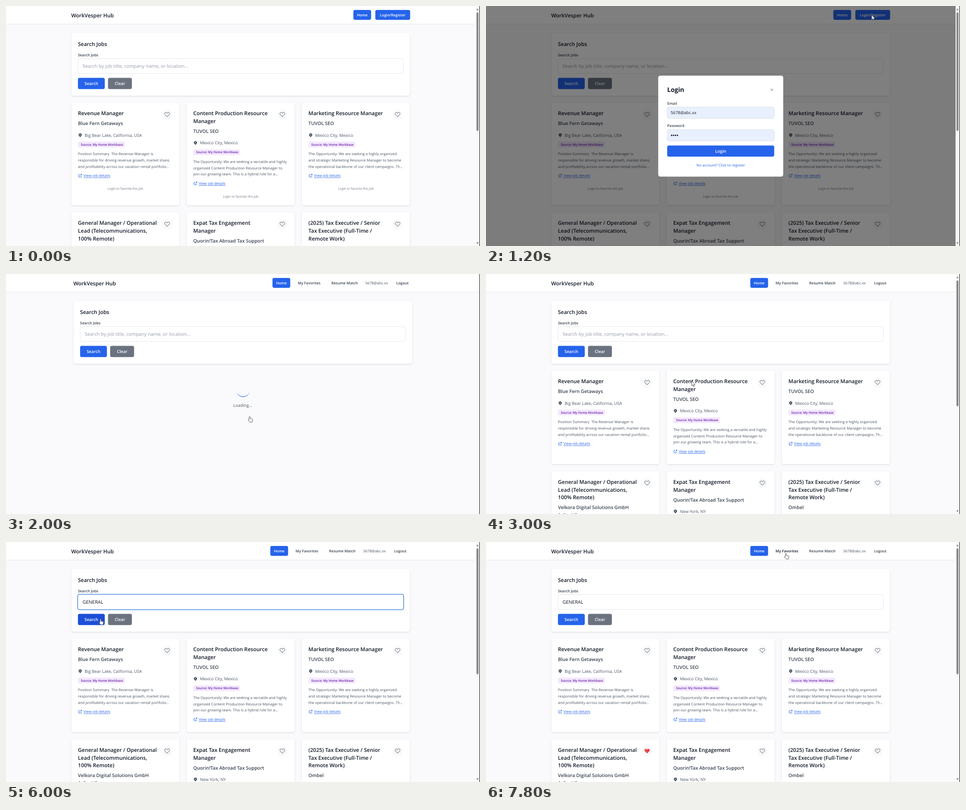
Recreate the animation shown at these times as an HTML page. Size 960 by 486 pixels, loop 8000 ms.

```html
<!DOCTYPE html>
<html lang="en">
<head>
<meta charset="utf-8">
<title>Job search</title>
<style>
  html, body { margin: 0; width: 100%; height: 100%; overflow: hidden; background: #fafafc; }
  svg { display: block; width: 100vw; height: 100vh; }
  text { font-family: "Open Sans", "Noto Sans", sans-serif; text-rendering: geometricPrecision; white-space: pre; }
  .card { filter: drop-shadow(0 1.6px 1.6px rgba(0, 0, 0, .13)); }
</style>
</head>
<body>
<svg id="stage" viewBox="0 0 960 486"></svg>
<script>
const LOOP = 8000, STEP = 200;
const BLUE = '#2563eb', BLUE_HOVER = '#1d4ed8', INK = '#111827', SLATE = '#374151', GRAY = '#4b5563', MUTED = '#6b7280';
const EMAIL = '5678@abc.xx';
const SOURCE = 'Source: My Home Workbase';

// Font sizes
const XL = 10.67, LG = 9.55, MD = 8.5, SM = 7.47, XS = 6.35;

const ICONS = {
  heart: 'M4.318 6.318a4.5 4.5 0 000 6.364L12 20.364l7.682-7.682a4.5 4.5 0 00-6.364-6.364L12 7.636l-1.318-1.318a4.5 4.5 0 00-6.364 0z',
  pin: 'M5.05 4.05a7 7 0 119.9 9.9L10 18.9l-4.95-4.95a7 7 0 010-9.9zM10 11a2 2 0 100-4 2 2 0 000 4z',
  link: 'M10 6H6a2 2 0 00-2 2v10a2 2 0 002 2h10a2 2 0 002-2v-4M14 4h6m0 0v6m0-6L10 14'
};

const POINTERS = {
  arrow: 'M0 0V10L2.4 7.8 4 11.2 5.4 10.6 3.9 7.3H7Z',
  hand: 'M-1.2 .8Q0-.7 1.2 .8V4.2L5 5Q6.2 5.3 6 6.9L5 11.4H.2L-3.2 7Q-2.8 5.5-1.2 6.6Z',
  beam: 'M-2-5H2M0-5V5M-2 5H2'
};

// Pointer keyframes: time, x, y, shape from that time on
const POINTER_PATH = [
  [400, 690, 120, 'arrow'], [800, 781, 18, 'hand'], [1200, 781, 18, 'arrow'],
  [1800, 491, 290, 'hand'], [2000, 493.5, 288.5, 'hand'], [2200, 493.5, 288.5, 'arrow'],
  [2800, 480, 260, 'arrow'], [3400, 290, 130, 'beam'], [3600, 250, 122, 'beam'], [4200, 250, 122, ''],
  [5600, 250, 122, 'beam'], [5800, 220, 140, 'arrow'], [6000, 191.5, 156, 'hand'],
  [6400, 191.5, 156, 'arrow'], [6800, 260, 300, 'arrow'], [7200, 326, 422, 'hand'],
  [7400, 326, 422, 'hand'], [7600, 470, 220, 'arrow'], [7800, 607.5, 23, 'hand'], [LOOP, 607.5, 23, '']
];

const TYPING = [[5200, 'GENERAL'], [5000, 'GENER'], [4600, 'GENE'], [4400, 'GE'], [4200, 'G'], [0, '']];

// Start and end of each loading phase
const LOADING = [[2000, 3000], [6200, 7000]];

const JOBS = [
  [
    { title: ['Revenue Manager'], company: ['Blue Fern Getaways'], place: 'Big Bear Lake, California, USA',
      about: ['Position Summary\u00a0 The Revenue Manager is', 'responsible for driving revenue growth, market share,', 'and profitability across our vacation rental portfolio...'] },
    { title: ['Content Production Resource', 'Manager'], company: ['TUVOL SEO'], place: 'Mexico City, Mexico',
      about: ['The Opportunity: We are seeking a versatile and highly', 'organized Content Production Resource Manager to', 'join our growing team. This is a hybrid role for a...'] },
    { title: ['Marketing Resource Manager'], company: ['TUVOL SEO'], place: 'Mexico City, Mexico',
      about: ['The Opportunity: We are seeking a highly organized', 'and strategic Marketing Resource Manager to become', 'the operational backbone of our client campaigns. Th...'] }
  ],
  [
    { title: ['General Manager / Operational', 'Lead (Telecommunications,', '100% Remote)'], company: ['Velkora Digital Solutions GmbH', '&amp; Co. KG'] },
    { title: ['Expat Tax Engagement', 'Manager'], company: ['Quorin!Tax Abroad Tax Support'], place: 'New York, NY' },
    { title: ['(2025) Tax Executive / Senior', 'Tax Executive (Full-Time /', 'Remote Work)'], company: ['Ombel'] }
  ]
];

const rect = (x, y, w, h, fill, r = 0, attrs = '') =>
  `<rect x="${x}" y="${y}" width="${w}" height="${h}" rx="${r}" fill="${fill}" ${attrs}/>`;

// y is the middle of the capital letters
const text = (x, y, content, size, fill, weight = 400, attrs = '') =>
  `<text x="${x}" y="${y + size * .357}" font-size="${size}" fill="${fill}" font-weight="${weight}" ${attrs}>${content}</text>`;

const centered = (x, y, content, size, fill, weight) =>
  text(x, y, content, size, fill, weight, 'text-anchor="middle"');

const icon = (d, x, y, scale, attrs) =>
  `<path d="${d}" transform="translate(${x} ${y}) scale(${scale})" ${attrs}/>`;

const button = (x, y, w, h, label, size, fill) =>
  rect(x, y, w, h, fill, 3.4) + centered(x + w / 2, y + h / 2 + .4, label, size, '#fff', 600);

const lines = (x, y, gap, rows, ...style) => rows.map((row, i) => text(x, y + i * gap, row, ...style)).join('');

function jobCard(job, x, y, height, loggedIn, favorite) {
  const left = x + 13.5;
  let out = rect(x, y, 219, height, '#fff', 4.5, 'class="card"');
  out += lines(left, y + 21.5, 15.75, job.title, XL, INK, 600);
  out += `<circle cx="${x + 194}" cy="${y + 24}" r="10.5" fill="#f8f9fa"/>`;
  out += icon(ICONS.heart, x + 187.25, y + 16.8, .5625, favorite
    ? 'fill="#ef4444" stroke="#ef4444" stroke-width="1"'
    : 'fill="none" stroke="#8b9099" stroke-width="2"');
  y += 15.75 * (job.title.length - 1);
  out += lines(left, y + 42, 15.75, job.company, LG, SLATE, 600);
  if (!job.place) return out;
  out += icon(ICONS.pin, left, y + 61, .45, `fill="${GRAY}" fill-rule="evenodd"`);
  out += text(x + 27, y + 65.5, job.place, MD, GRAY);
  if (!job.about) return out;
  out += rect(left, y + 78.6, 95, 11.6, '#f3e8ff', 2.3);
  out += text(x + 19.2, y + 84.4, SOURCE, XS, '#6b21a8', 600);
  out += lines(left, y + 103.4, 12.8, job.about, SM, GRAY);
  out += icon(ICONS.link, left, y + 143, .375, `fill="none" stroke="${BLUE}" stroke-width="2.4"`);
  out += text(x + 24.7, y + 147.8, 'View job details', SM, BLUE, 400, 'text-decoration="underline"');
  if (!loggedIn) out += centered(x + 109.5, y + 174, 'Login to favorite this job', XS, MUTED);
  return out;
}

function jobList(loggedIn, favorite) {
  const height = loggedIn ? 189 : 207.5;
  return JOBS.map((row, r) => row.map((job, c) =>
    jobCard(job, 132.3 + c * 233.4, 196 + r * (height + 14.5), height, loggedIn, favorite && r === 1 && c === 0)
  ).join('')).join('');
}

function navigation(t, loggedIn) {
  let out = text(132, 18.8, 'WorkVesper Hub', XL, INK, 600);
  if (!loggedIn) {
    const hover = t >= 800 && t < 1200;
    return out + button(703.5, 8, 36, 20, 'Home', SM, BLUE) +
      button(748, 8, 70.5, 20, 'Login/Register', SM, hover ? BLUE_HOVER : BLUE);
  }
  return out + button(535.3, 8, 36, 20, 'Home', SM, BLUE) +
    text(586.6, 18.6, 'My Favorites', SM, t >= 7800 ? INK : SLATE, 600) +
    text(654.6, 18.6, 'Resume Match', SM, SLATE, 600) +
    text(723.4, 18.6, EMAIL, SM, GRAY) +
    text(786, 18.6, 'Logout', SM, SLATE, 600);
}

function searchPanel(t) {
  const typed = TYPING.find(([start]) => t >= start)[1];
  const focused = t >= 3600 && t < 6200;
  const caret = focused && t < 5600 ? `<tspan dx="-2" fill="${INK}">|</tspan>` : '';
  const hover = t >= 6000 && t < 6200;
  return rect(132.3, 55, 686, 126.7, '#fff', 4.5, 'class="card"') +
    text(145.7, 76.8, 'Search Jobs', XL, INK, 600) +
    text(145.7, 99.2, 'Search Jobs', SM, SLATE, 600) +
    (focused
      ? rect(145.1, 105.9, 660.3, 31.2, '#fff', 4, 'stroke="#3b7bdc" stroke-width="1.3"')
      : rect(145.8, 106.6, 659, 30, '#fff', 4, 'stroke="#dfe2e7" stroke-width=".8"')) +
    (typed ? '' : text(155, 122, 'Search by job title, company name, or location...', 9.62, '#949ba8')) +
    (typed || caret ? text(155, 122, typed + caret, 9.62, INK) : '') +
    button(145.7, 145.5, 54.3, 22.7, 'Search', MD, hover ? BLUE_HOVER : BLUE) +
    button(206.6, 145.5, 48.4, 22.7, 'Clear', MD, MUTED);
}

function spinner(elapsed) {
  return `<path transform="translate(480 235.5) rotate(${elapsed * .36})" fill="${BLUE}"
    d="M-13.5 0A13.5 13.5 0 0 0 13.5 0A13.5 12.3 0 0 1-13.5 0Z"/>` +
    centered(479.6, 266, 'Loading...', MD, GRAY);
}

function scrollbar(thumbHeight) {
  return rect(951, 0, 8, 486, '#fafafa') + rect(952.8, 13, 4.4, thumbHeight, '#8b8b8b', 2.2) +
    '<path d="M952.4 8.5L955 4.8 957.6 8.5ZM952.4 478.5L955 482.2 957.6 478.5Z" fill="#8b8b8b"/>';
}

function loginDialog(t) {
  const field = (y, label) => text(367, y - 7.8, label, SM, SLATE, 600) +
    rect(367, y, 216.7, 23, '#e8f0fe', 3.4, 'stroke="#d1d5db" stroke-width=".6"');
  const dots = [0, 1, 2, 3].map(i => `<circle cx="${376 + i * 3.9}" cy="262" r="1.4" fill="${INK}"/>`).join('');
  return rect(0, 0, 951, 486, '#000', 0, 'opacity=".5"') +
    rect(348.8, 141, 253.2, 204.5, '#fff', 4.5) +
    text(367, 169.5, 'Login', 12.7, INK, 700) +
    '<path d="M576.4 167.2l5 5m0-5l-5 5" stroke="#6b7280" stroke-width=".9"/>' +
    field(204.7, 'Email') + text(374, 216.3, EMAIL, MD, INK) +
    field(250.3, 'Password') + dots +
    button(367, 282.5, 216.7, 22.5, 'Login', MD, t >= 1800 ? BLUE_HOVER : BLUE) +
    centered(475.3, 322, 'No account? Click to register', SM, BLUE);
}

function pointer(t) {
  const next = POINTER_PATH.findIndex(([start]) => start > t);
  if (next < 1) return '';
  const [t0, x0, y0, shape] = POINTER_PATH[next - 1];
  if (!shape) return '';
  const [t1, x1, y1] = POINTER_PATH[next];
  const k = (t - t0) / (t1 - t0);
  return icon(POINTERS[shape], x0 + (x1 - x0) * k, y0 + (y1 - y0) * k, 1,
    'fill="#fff" stroke="#222" stroke-width=".7" stroke-linejoin="round"');
}

function scene(t) {
  const loggedIn = t >= 2000;
  const loading = LOADING.find(([start, end]) => t >= start && t < end);
  const page = navigation(t, loggedIn) + searchPanel(t) + (loading ? '' : jobList(loggedIn, t >= 7400));
  // Without a scrollbar the centred layout moves to the right
  return rect(0, 0, 960, 486, '#fafafc') +
    rect(0, 0, 960, 36.5, '#fff') + rect(0, 36.2, 960, .9, '#e3e5e9') +
    `<g transform="translate(${loading ? 4.4 : 0} 0)">${page}</g>` +
    (loading ? spinner(t - loading[0]) : scrollbar(loggedIn ? 255 : 240)) +
    (t >= 1200 && t < 2000 ? loginDialog(t) : '') +
    rect(959, 0, 1, 486, '#1a1a1a') +
    pointer(t);
}

const stage = document.getElementById('stage');
const startTime = performance.now();
let shown = -1;

function draw() {
  const elapsed = (performance.now() - startTime) % LOOP;
  const t = Math.floor(elapsed / STEP) * STEP;
  if (t !== shown) stage.innerHTML = scene(shown = t);
  requestAnimationFrame(draw);
}
draw();
</script>
</body>
</html>
```
